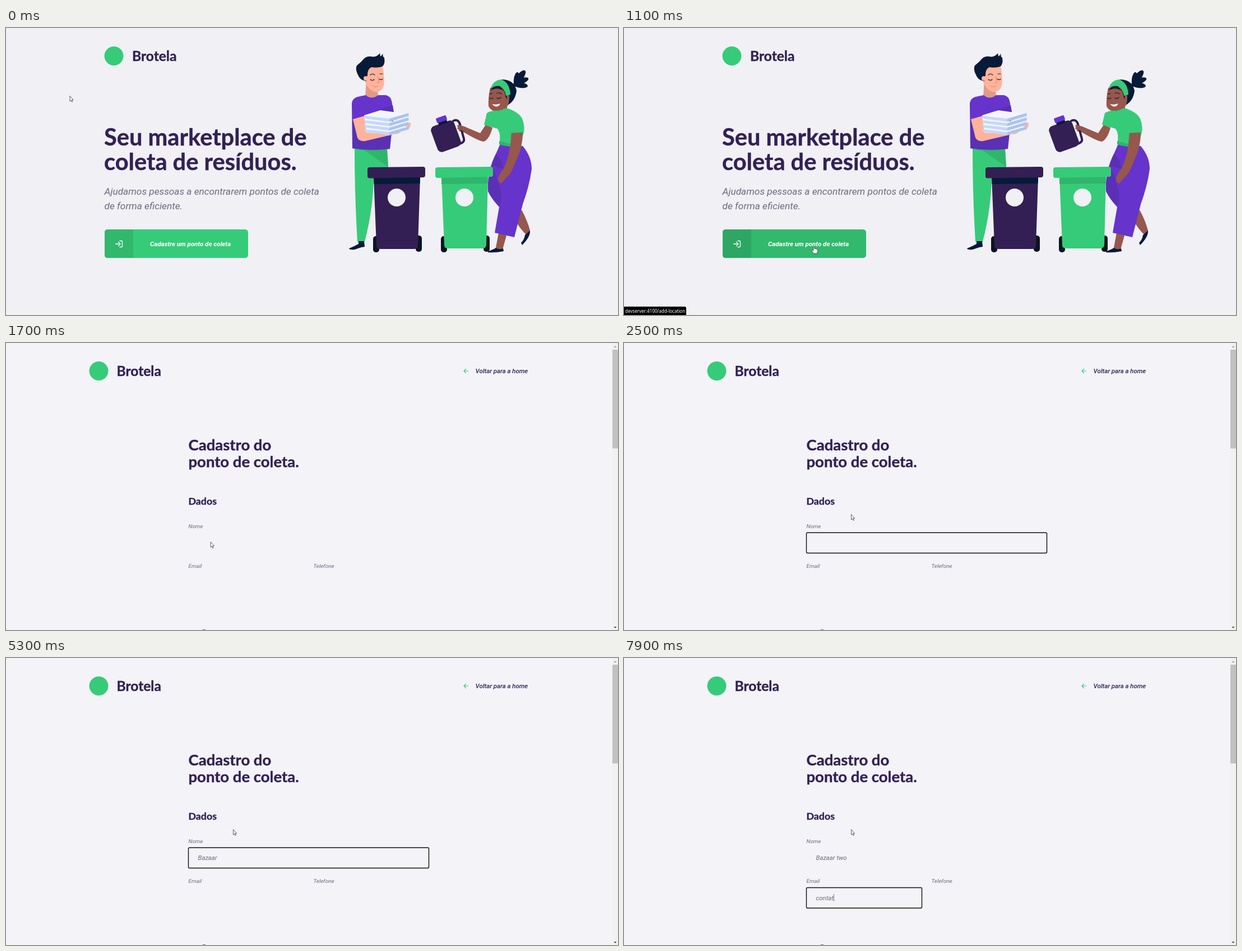
An HTML page for the animation above (8000 ms loop, 1092 by 513 pixels).

```html
<!DOCTYPE html>
<html lang="pt-BR">
<head>
<meta charset="utf-8">
<title>Ponto de coleta</title>
<style>
  html, body { margin: 0; width: 100%; height: 100%; overflow: hidden; background: #f0f0f5; }
  svg { display: block; width: 1092px; height: 513px; }
  text { white-space: pre; }
  .head { font-family: Lato, sans-serif; font-weight: 700; fill: #322153; stroke: #322153; stroke-width: .4; }
  .body { font-family: Roboto, sans-serif; font-style: italic; fill: #6c6c80; }
  .label { font-size: 9.95px; }
  .typed { font-size: 11.38px; }
  .navy { fill: #071a38; } .plum { fill: #331f54; } .green { fill: #36cb79; } .shade { fill: #30b56c; }
  .purple { fill: #6633cc; } .violet { fill: #5a30b4; } .peach { fill: #ffb39a; } .brown { fill: #96574c; }
  .line { fill: none; stroke: #071a38; stroke-linecap: round; stroke-linejoin: round; }
  .cursor { fill: #fff; stroke: #222; stroke-width: .7; stroke-linejoin: round; }
</style>
</head>
<body>
<svg viewBox="0 0 1092 513">
  <g id="home">
    <rect width="1092" height="513" fill="#f0f0f5"/>
    <circle cx="192.5" cy="50" r="17" class="green"/>
    <text class="head" x="225" y="58.5" font-size="24.6">Brotela</text>
    <g class="head" font-size="41.6">
      <text x="175" y="209.5">Seu marketplace de</text>
      <text x="175" y="254">coleta de resíduos.</text>
    </g>
    <g class="body" font-size="17.25">
      <text x="175.5" y="297.5">Ajudamos pessoas a encontrarem pontos de coleta</text>
      <text x="175.5" y="324">de forma eficiente.</text>
    </g>
    <rect x="176" y="360" width="256" height="51" rx="5.5" class="green"/>
    <path d="M227 360H181.5Q176 360 176 365.5V405.5Q176 411 181.5 411H227Z" fill="#31b86d"/>
    <rect id="hover" x="176" y="360" width="256" height="51" rx="5.5"/>
    <path d="M203 380.5H206Q207.5 380.5 207.5 382V390Q207.5 391.5 206 391.5H203M195.5 386H204M200.5 382.5L204 386L200.5 389.5" class="line" style="stroke:#fff" stroke-width="1.3"/>
    <text class="body" x="329" y="390" font-size="11.5" font-weight="700" text-anchor="middle" style="fill:#fff">Cadastre um ponto de coleta</text>

    <g id="man">
      <path class="green" d="M622 214L680 216L682 250L656 262Q656 320 640 382H627Q622 300 622 214Z"/>
      <path class="shade" d="M623 217H680L682 248Q650 226 640 219Z"/>
      <path class="navy" d="M612 394Q622 390 629 386L629 381H639L640 391L634 392L622 396Q613 397 612 394Z"/>
      <path d="M643 90L641 123Q652 130 664 123L663 110Z" fill="#e09a88"/>
      <path class="peach" d="M641 70L672 67Q676 92 674 103Q670 116 657 114Q645 110 640 93Z"/>
      <path class="navy" d="M631 89Q622 75 626 67Q632 62 635 59Q642 49 652 51Q661 53 667 45L668 51L673 46Q671 51 675 53Q677 65 671 69Q662 72 652 70Q645 73 645 84L643 95L639 94Q634 93 631 89Z"/>
      <circle class="peach" cx="642" cy="90" r="4"/>
      <path class="line" d="M650 92Q654 95 657 92M666 91Q669 94 672 91M650 84Q654 80 658 84M667 82L672 82" stroke-width="1.1"/>
      <path class="line" d="M663 86L666 97L662 98M655 104Q660 107 664 103" stroke-width="1" style="stroke:#d58573"/>
      <path class="purple" d="M632 122L642 120Q652 129 664 120L678 120Q686 122 688 130L692 152L685 216Q650 220 618 215L617 135Q618 124 632 122Z"/>
      <path class="violet" d="M618 165L640 158L645 198L686 190L685 216Q650 220 618 215ZM663 147L690 138L692 150L670 151Z"/>
      <path class="peach" d="M619 163L640 157L643 181H690Q702 176 705 184Q702 190 692 190L645 201Q632 205 627 196Z"/>
      <path class="peach" d="M712 172L722 169Q723 180 713 183Z"/>
      <path d="M639 156L668 147L690 150L718 152L684 165L719 178L691 190L643 187Z" fill="#f2f5fc"/>
      <g id="papers"></g>
    </g>

    <g id="woman">
      <path class="brown" d="M912 338L920 325Q931 346 935 362L930 371Q916 358 910 345Z"/>
      <path class="navy" d="M935 362Q936 373 921 388L919 384Q925 378 926 370Z"/>
      <path class="brown" d="M879 366L893 371L886 396L873 398Z"/>
      <path class="navy" d="M860 399Q870 396 874 393Q880 397 887 394L888 399Q872 402 860 401Z"/>
      <path class="purple" d="M882 207L922 211Q938 230 938 252Q934 282 922 315L907 374L872 366L880 320Q866 305 860 292Q858 255 875 223Z"/>
      <path class="violet" d="M875 224Q862 250 860 290Q868 307 881 319L884 296L868 246L888 252L884 238Z"/>
      <g class="navy">
        <path d="M884 92Q907 92 911 112Q909 130 895 138L891 118Z"/>
        <ellipse cx="911" cy="92" rx="5" ry="13" transform="rotate(7 911 92)"/>
        <ellipse cx="917" cy="88" rx="6" ry="15" transform="rotate(37 917 88)"/>
        <ellipse cx="920" cy="95" rx="5" ry="13" transform="rotate(68 920 95)"/>
        <ellipse cx="918" cy="102" rx="5" ry="13" transform="rotate(98 918 102)"/>
      </g>
      <path class="brown" d="M864 107Q860 125 861 140Q866 150 878 149L880 154L894 149V141Q900 132 897 115L883 100Z"/>
      <path class="navy" d="M864 112Q870 102 880 103L894 118L893 128L889 113Q877 104 864 112Z"/>
      <path class="green" d="M865 107Q870 93 884 92Q899 98 900 119L892 121Q890 108 882 104Q874 102 865 107Z"/>
      <path class="line" d="M863 125Q866 128 869 125M876 125Q879 128 883 124M863 118L868 117M876 117Q880 114 884 118" stroke-width="1.1"/>
      <path d="M867 136Q875 138 882 135Q879 142 872 140Z" fill="#fff"/>
      <path class="brown" d="M856 173L868 178Q863 198 853 203Q845 203 818 187L808 184L807 173L820 177L846 188Z"/>
      <path class="green" d="M858 152Q866 147 879 148L893 143Q915 150 921 162Q927 178 923 190L917 212Q895 213 880 208Q884 190 877 180L853 173Z"/>
      <path class="shade" d="M880 202L900 207L901 187L922 186L921 191L917 212Q895 213 880 208Z"/>
      <path class="brown" d="M902 188L922 187Q922 215 909 240Q901 262 893 267L884 278L879 275L878 268Q882 257 888 251Q900 225 902 188Z"/>
    </g>

    <g id="jug">
      <path class="line" d="M798 166Q807 162 810 172L817 198Q819 205 806 208" stroke-width="4" style="stroke:#331f54"/>
      <rect class="plum" x="-22" y="-24.5" width="44" height="49" rx="8" transform="translate(785 193.5) rotate(-20)"/>
      <rect class="navy" x="-8" y="-4" width="16" height="8" transform="translate(779 168) rotate(-20)"/>
      <rect class="purple" x="-9.5" y="-4.5" width="19" height="9" rx="2" transform="translate(777 163) rotate(-20)"/>
      <path class="line" d="M807 175L818 178M807 179L817 182" stroke-width="3.5" style="stroke:#96574c"/>
    </g>

    <g id="bins">
      <g fill="#0b1520">
        <rect x="655" y="372" width="11" height="29" rx="5"/><rect x="731" y="371" width="11" height="29" rx="5"/>
        <rect x="776" y="372" width="11" height="29" rx="5"/><rect x="852" y="371" width="11" height="29" rx="5"/>
      </g>
      <path class="plum" d="M656 266H739L735 388Q735 395 729 395H668Q661 395 661 389Z"/>
      <path class="navy" d="M656 266H739L738.5 278L656.5 279Z"/>
      <path class="plum" d="M649 249L744 248Q748 248 748 252V263Q748 267 744 267L649 268.5Q645 268.5 645 265V253Q645 249 649 249Z"/>
      <path class="green" d="M777 266H860L857 388Q856 394 850 394H789Q782 394 782 388Z"/>
      <path class="shade" d="M777 266H860L859.5 278L777 279Z"/>
      <path class="green" d="M770 249L865 248Q869 248 869 252V263Q869 266 865 266L770 268Q766 268 766 264V253Q766 249 770 249Z"/>
      <circle cx="697" cy="303" r="16" fill="#f0f0f5"/><circle cx="818" cy="303" r="16" fill="#f0f0f5"/>
    </g>
  </g>

  <g id="form">
    <rect width="1092" height="513" fill="#f3f3f8"/>
    <circle cx="165.5" cy="50" r="17" class="green"/>
    <text class="head" x="197.5" y="58.5" font-size="24.6">Brotela</text>
    <path class="line" d="M824.5 50H817M820.5 46.5L817 50L820.5 53.5" stroke-width="1.2" style="stroke:#34cb79"/>
    <text class="body" x="837.5" y="54" font-size="11.38" font-weight="500" style="fill:#322153">Voltar para a home</text>
    <g class="head">
      <text x="325.5" y="192" font-size="27.5">Cadastro do</text>
      <text x="325.5" y="222" font-size="27.5">ponto de coleta.</text>
      <text x="325.5" y="289" font-size="17.8">Dados</text>
    </g>
    <text class="body label" x="325.5" y="331">Nome</text>
    <text class="body label" x="325.5" y="402">Email</text>
    <text class="body label" x="548.5" y="402">Telefone</text>
    <rect id="ring" x="325.5" height="36.5" rx="2" fill="none" stroke="#101010" stroke-width="1.4"/>
    <text class="body typed" id="name" x="342.5" y="361"></text>
    <text class="body typed" id="mail" x="342.5" y="432.5"></text>
    <rect id="caret" width=".8" height="13" fill="#555566"/>
    <rect x="351" y="512" width="5" height="1" fill="#6d6285"/>
    <rect x="1082" width="10" height="513" fill="#f1f1f1"/>
    <rect x="1082" y="12" width="10" height="176.5" fill="#c1c1c1"/>
    <path d="M1084.5 8L1087 5L1089.5 8Z" fill="#a3a3a3"/>
    <path d="M1084.5 507L1087 510L1089.5 507Z" fill="#505050"/>
  </g>

  <g id="status">
    <path id="bar"/>
    <text x="2" y="509" font-size="8" font-family="'Noto Sans', sans-serif" fill="#fff">devserver:4100/add-location</text>
  </g>

  <g id="pointer">
    <path id="arrow" class="cursor" d="M.5 .5V10L2.5 8L4 11.2L5.3 10.7L4 7.5H6.6Z"/>
    <path id="hand" class="cursor" d="M-.5 8V1Q.5 -.5 1.5 1V4.5Q3 3.5 3.5 5Q5 4.2 5.5 5.5Q7 5 7.2 6.5V9L6 13H0L-3.5 8.5Q-3.5 6.5 -2 7Z"/>
    <path id="beam" class="line" d="M-2 -6.5H2M0 -6.5V6.5M-2 6.5H2" stroke-width=".9"/>
  </g>
</svg>
<script>
const LOOP = 8000, STEP = 100;
const $ = id => document.getElementById(id);
const show = (id, on) => { $(id).style.display = on ? '' : 'none'; };
const set = (id, attrs) => { for (const key in attrs) $(id).setAttribute(key, attrs[key]); };
const clamp = v => Math.min(1, Math.max(0, v));

$('papers').innerHTML = [0, 8, 16, 24].map(dy => `<g transform="translate(0 ${dy})">
  <path d="M639 157L684 162V167.500L642 162Q639 160 639 157Z" fill="#c6d7fa"/>
  <path d="M684 162L718 152L719 157L684 167.500Z" fill="#abc4ee"/></g>`).join('');

// Pointer path: time, x, y
const path = [
  [100, 113.5, 121], [800, 315, 372], [1100, 338.5, 390], [1500, 338.5, 390],
  [1800, 374, 343], [2100, 374, 343], [2300, 412, 301], [2500, 405, 306]
];
const fields = {
  name: { text: 'Bazaar two', keys: [3700, 3800, 4000, 4400, 4500, 4800, 5500, 5900, 6100, 6200], y: 339, width: 429 },
  mail: { text: 'contat', keys: [7100, 7300, 7400, 7500, 7700, 7900], y: 410.5, width: 206 }
};
const caretOff = [[2500, 3000], [3600, 3700], [5300, 5500]];

function pointerAt(t) {
  const next = path.findIndex(p => p[0] > t);
  if (next === 0) return path[0].slice(1);
  if (next < 0) return path[path.length - 1].slice(1);
  const [t0, x0, y0] = path[next - 1], [t1, x1, y1] = path[next];
  const k = (t - t0) / (t1 - t0), ease = k * k * (3 - 2 * k);
  return [x0 + (x1 - x0) * ease, y0 + (y1 - y0) * ease];
}

function draw(t) {
  const onForm = t >= 1300;
  show('home', !onForm);
  show('form', onForm);
  set('hover', { opacity: 0.09 * clamp((t - 700) / 200) });

  show('status', t >= 800 && t < 1600);
  set('bar', { d: `M0 498H${onForm ? 359 : 108}q3 0 3 3V513H0Z` });

  for (const id in fields) {
    const { text, keys } = fields[id];
    $(id).textContent = text.slice(0, keys.filter(k => k <= t).length);
  }
  const id = t < 6600 ? 'name' : 'mail', { y, width } = fields[id], focused = t >= 2000;
  show('ring', focused);
  set('ring', { y, width });
  show('caret', focused && !caretOff.some(([from, to]) => t >= from && t < to));
  if (focused) set('caret', { x: 342.5 + ($(id).textContent ? $(id).getComputedTextLength() : 0), y: y + 11.5 });

  const hand = t >= 800 && t < 1300, beam = t >= 1800 && t < 2200;
  set('pointer', { transform: `translate(${pointerAt(t)})` });
  show('hand', hand);
  show('beam', beam);
  show('arrow', !hand && !beam);
}

function tick() {
  draw(Math.floor(performance.now() % LOOP / STEP) * STEP);
  requestAnimationFrame(tick);
}
tick();
</script>
</body>
</html>
```
